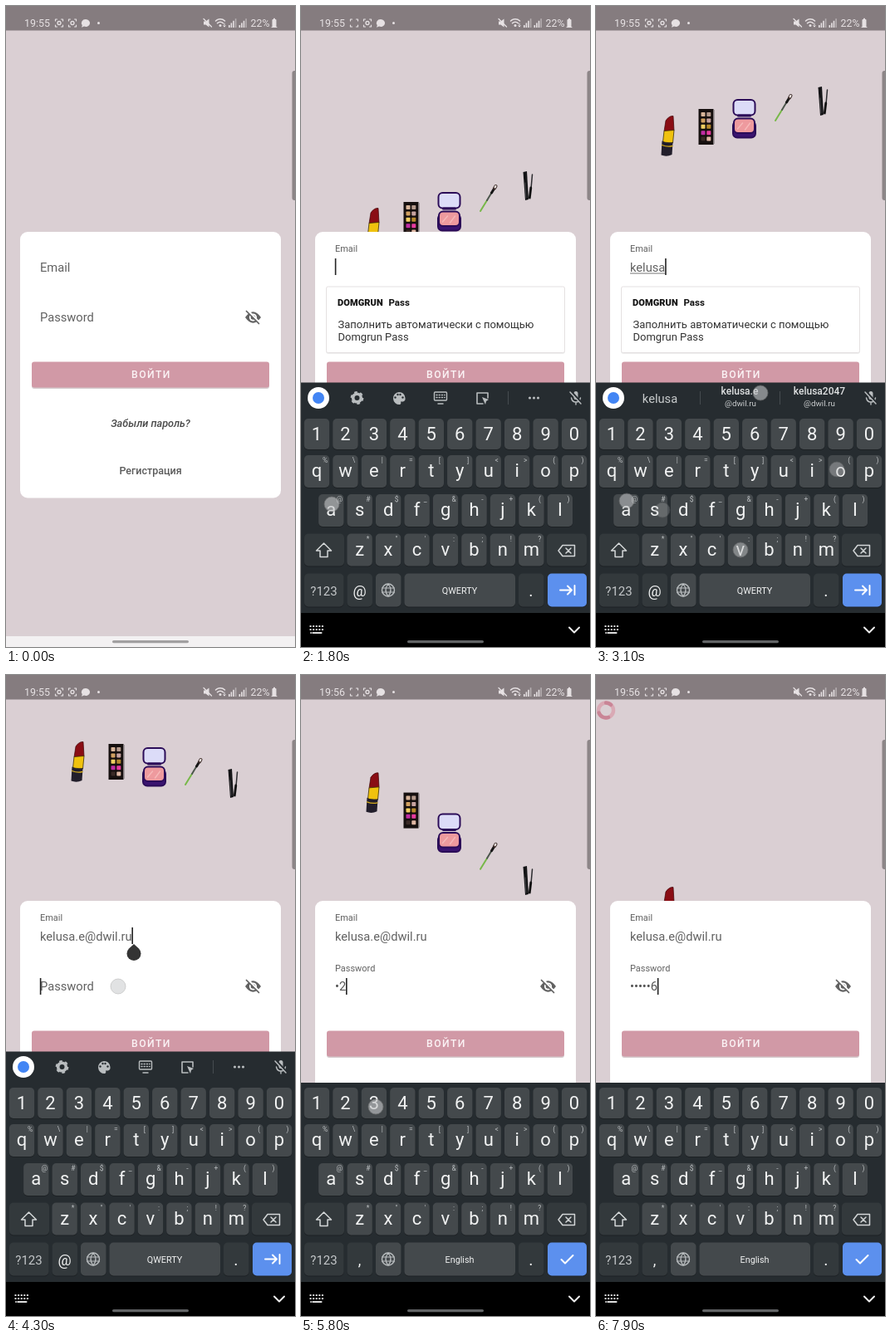
Animation of 348 by 772 pixels, one loop 8000 ms. Source, as an HTML page:

```html
<!DOCTYPE html>
<html lang="ru">
<head>
<meta charset="utf-8">
<title>Login screen</title>
<style>
  html, body { margin: 0; width: 100%; height: 100%; overflow: hidden; background: #dacfd3; }
  svg { display: block; width: 100vw; height: 100vh; font-family: Roboto, "Noto Sans", sans-serif; }
  .mid { text-anchor: middle; }
  .medium { font-weight: 500; }
  .line { fill: none; stroke-linecap: round; stroke-linejoin: round; }
</style>
</head>
<body>
<svg id="stage" viewBox="0 0 348 772" xmlns="http://www.w3.org/2000/svg"></svg>
<script>
const LOOP = 8000;
const USER = 'kelusa', HOST = '@dwil.ru', MAIL = USER + '.e' + HOST, BRAND = 'Domgrun';

const rect = (x, y, w, h, fill, r = 0, extra = '') =>
  `<rect x="${x}" y="${y}" width="${w}" height="${h}" rx="${r}" fill="${fill}" ${extra}/>`;
const circle = (x, y, r, fill, extra = '') => `<circle cx="${x}" cy="${y}" r="${r}" fill="${fill}" ${extra}/>`;
const text = (x, y, size, fill, str, extra = '') =>
  `<text x="${x}" y="${y}" font-size="${size}" fill="${fill}" ${extra}>${str}</text>`;
const mid = (x, y, size, fill, str, extra = '') => text(x, y, size, fill, str, `text-anchor="middle" ${extra}`);
const shape = (d, fill, extra = '') => `<path d="${d}" fill="${fill}" ${extra}/>`;
const line = (d, stroke, width = 1.4, extra = '') =>
  `<path class="line" d="${d}" stroke="${stroke}" stroke-width="${width}" ${extra}/>`;
const group = (id, body, extra = '') => `<g id="${id}" ${extra}>${body}</g>`;
const repeat = (n, fn) => Array.from({ length: n }, (_, i) => fn(i)).join('');

function statusBar() {
  const c = '#e6e1e3';
  const corners = x => line(`M${x - 4.5} 18v-2h2M${x + 2.5} 16h2v2M${x + 4.5} 23v2h-2M${x - 2.5} 25h-2v-2`, c, 1.2);
  const bars = x => repeat(4, i => rect(x + i * 2.6, 23 - i * 2.6, 1.6, 3 + i * 2.6, c, 0, `opacity="${i > 2 ? .5 : 1}"`));
  return rect(0, 0, 348, 29.5, '#857c7f') +
    text(22, 25, 12.45, c, '', 'id="clock"') +
    corners(64) + circle(64, 20.5, 2, 'none', `id="shot" stroke="${c}" stroke-width="1.3"`) +
    corners(80) + circle(80, 20.5, 2, 'none', `stroke="${c}" stroke-width="1.3"`) +
    shape('M96 16a5 4.5 0 1 1-2 8.6l-3 1.2 .8-2.6A5 4.5 0 0 1 96 16z', c) + circle(111.5, 20.5, 1.5, c) +
    shape('M238 18.5h2.5l4-3v10l-4-3H238z', c) + line('M238 15.5l9.5 9.5', c, 1.3) +
    line('M252.5 18a8 8 0 0 1 11 0M254.5 20.8a5 5 0 0 1 7 0', c, 1.5) + circle(258, 23.5, 1.5, c) +
    line('M263 21v4m-1.2-1.2l1.2 1.2l1.2-1.2', c, 1) +
    bars(268) + bars(280.5) + text(294.5, 25, 12.4, c, '22%') +
    rect(320.5, 16, 5, 9.5, c, 1) + rect(322, 14.8, 2, 2, c) + line('M320 25.5h6', c, 1);
}

const lipstick =
  shape('M4 19L6 6Q10 0 15 .5L16 18z', '#8a0d14', 'stroke="#3d0508" stroke-width=".7"') +
  shape('M4 18.5L16 17.5L14.5 33L2.5 32z', '#f0c20e', 'stroke="#3c2f06" stroke-width=".8"') +
  shape('M1.5 30.5Q8 34 14.5 32L13.5 47Q7 50 .5 47.5z', '#221e2b') +
  line('M1.5 35.5Q8 38 14 36.5', '#d6ad1c', 1.3);
const paletteTones = ['#d8b59a', '#b59a8c', '#d0a060', '#c7a3a0', '#f0cf62', '#b78a2c', '#c02ca4', '#e83aa0', '#3a2a26', '#e0b8a4'];
const palette = rect(0, 0, 18, 43, '#16100f') + rect(18, 1, 1.2, 41, '#8d8688') +
  paletteTones.map((c, i) => rect(3 + i % 2 * 6.8, 4 + (i >> 1) * 7.4, 5, 5, c, .8)).join('');
const edge = 'stroke="#2b0c58" stroke-width="2"';
const powder =
  rect(1.5, 27, 27, 19.5, '#3a1470', 5, edge) + rect(2.5, 23.5, 25, 17.5, '#ee9a9e', 5, edge) +
  line('M7 36l6-7M16 37l6-8', '#f6b9b9', 1.4) +
  rect(2, 1, 26, 18.5, '#dcdcf8', 5, edge) + line('M8 20h14', '#2b0c58', 3);
const brush =
  line('M1 32L9 19', '#77b848', 2) + line('M9 19L15 9', '#4c564c', 2) +
  line('M14.5 10L17.5 5', '#151515', 3) + line('M18 4.5L19.5 2', '#3a2b28', 4) + line('M18.6 3.4L19.4 2', '#f1e7e3', 2.2);
const mascara =
  shape('M0 1L4.5 0L6.5 34L2.5 35z', '#141416') + line('M2.5 14l1 18', '#55555a', .8) +
  line('M11 4L9.5 21', '#2b2b2e', 1.5) + line('M9.3 20L7.8 32', '#111', 2.8);

// Height of each cosmetic's top edge: [seconds, y]
const items = [
  { id: 'lipstick', x: 78, art: lipstick, path: [[.5, 345], [1.8, 243], [3.1, 132], [4.3, 80], [5.1, 88], [6.7, 173], [8, 262]] },
  { id: 'palette', x: 123.5, art: palette, path: [[.5, 340], [1.8, 236], [3.1, 124], [4.3, 83], [5.1, 103], [6.7, 205], [8, 292]] },
  { id: 'powder', x: 163.5, art: powder, path: [[.5, 330], [1.8, 224], [3.1, 112], [4.3, 87], [5.1, 120], [6.7, 236], [8, 325]] },
  { id: 'brush', x: 215, art: brush, path: [[.5, 322], [1.8, 215], [3.1, 106], [4.3, 100], [5.1, 147], [6.7, 276], [8, 360]] },
  { id: 'mascara', x: 267.5, art: mascara, path: [[.5, 305], [1.8, 199], [3.1, 97], [4.3, 113], [5.1, 174], [6.7, 300], [8, 385]] }
];

function card() {
  const g = '#616161';
  return rect(17, 272, 314, 320.5, '#fff', 9) +
    text(0, 0, 14.7, g, 'Email', 'id="mailLabel"') + text(0, 0, 14.7, g, 'Password', 'id="passLabel"') +
    text(41, 319.5, 14.7, '#626262', '', 'id="mail"') + rect(41, 321.5, 43, 1, '#777', 0, 'id="underline"') +
    text(41, 380, 14.7, '#555', '', 'id="pass"') +
    rect(0, 304, 1.6, 20, '#222', 0, 'id="mailCaret"') + rect(0, 365, 1.6, 20, '#222', 0, 'id="passCaret"') +
    shape('M154 324l6 5.5a8.5 8.5 0 1 1-12 0z', '#343434', 'id="handle"') +
    shape('M288 375Q297.500 361.500 307 375Q297.500 388.500 288 375z', g) + circle(297.5, 375, 4.6, '#fff') + circle(297.5, 375, 2.8, g) +
    line('M290.500 366.500L305.500 382', '#fff', 3.2) + line('M289.500 367.500L304.500 382.500', g, 1.7) +
    rect(31, 430, 286, 31, '#b9a9ad', 3, 'opacity=".6"') + rect(31, 428.5, 286, 31, '#d199a6', 3) +
    mid(175, 448.3, 12.2, '#fbf3f5', 'ВОЙТИ', 'class="medium" letter-spacing="1.4"') +
    mid(174, 506.5, 12.7, '#4a4a4a', 'Забыли пароль?', 'class="medium" font-style="italic"') +
    mid(174, 563.5, 12.5, '#5a5a5a', 'Регистрация', 'class="medium"');
}

function popup() {
  return group('popupLight',
    rect(30, 339, 288, 80, '#000', 3, 'opacity=".07"') + rect(30.5, 338, 287, 79.5, '#fff', 2, 'stroke="#e4e0e1"') +
    text(44, 361, 11, '#111', BRAND.toUpperCase(), 'font-weight="900" letter-spacing=".1"') +
    text(105.5, 361, 11.5, '#111', 'Pass', 'font-weight="700"') +
    text(44.5, 388, 13, '#333', 'Заполнить автоматически с помощью') +
    text(44.5, 403, 13, '#333', BRAND + ' Pass')) +
    rect(35, 339, 277, 77, '#000', 1, 'id="popupDark" opacity=".6"');
}

function keyboard() {
  const KEY = '#44494c', DIM = '#33393c', INK = '#f1f2f2', SOFT = '#b9bdbf';
  const key = (x, y, w, h, fill = KEY) => rect(x, y + 1, w, h, '#1d2124', 5) + rect(x, y, w, h, fill, 5);
  const row = (chars, hints, x, y, h) => [...chars].map((ch, i) => {
    const cx = x + i * 34.45;
    return key(cx - 15.2, y, 30.4, h) + mid(cx, y + h / 2 + (hints ? 6.5 : 7.8), 22, INK, ch) +
      (hints ? mid(cx + 10, y + 9, 8.5, SOFT, hints[i].replace('&', '&amp;').replace('<', '&lt;')) : '');
  }).join('');

  const toolbar = group('toolbar',
    circle(67.5, 472, 4.8, 'none', `stroke="${SOFT}" stroke-width="3.600"`) +
    circle(67.5, 472, 6.9, 'none', `stroke="${SOFT}" stroke-width="2" stroke-dasharray="3.600 3.625"`) +
    shape('M118 465a7.500 7.500 0 1 0 1 15q2-1 1-3.500h3q3-1 2.500-4.500q-1-7-7.500-7z', SOFT) +
    repeat(4, i => circle(113.5 + i * 3, i % 3 ? 468 : 471.5, 1.2, '#262c30')) +
    rect(160.5, 465, 15, 10, 'none', 1, `stroke="${SOFT}" stroke-width="1.4"`) +
    line('M163 468.500h10M163 471.500h10', SOFT, 1.5, 'stroke-dasharray="1 2.200"') + line('M165 479h6', SOFT, 1.5) +
    line('M219 479h-7v-13h13v6', SOFT, 1.6) + shape('M218 471l8 3-3 2-1 4z', SOFT) +
    rect(249, 464, 1, 16, '#454b4f') + repeat(3, i => circle(275.5 + i * 5, 472, 1.6, SOFT)));
  const suggestions = group('suggestions',
    mid(77, 478, 14.7, '#c9cccd', '', 'id="typed"') + rect(125, 464, 1, 16, '#454b4f') + rect(221, 464, 1, 16, '#454b4f') +
    mid(173, 468, 12, '#dfe1e2', USER + '.e', 'class="medium"') + mid(174, 482, 9.8, '#c9cccd', HOST) +
    mid(269, 468, 12, '#dfe1e2', USER + '2047', 'class="medium"') + mid(269, 482, 9.8, '#c9cccd', HOST));
  const strip = group('strip', rect(0, 453.5, 348, 40, '#262c30') +
    circle(21, 472, 13, '#fff') + circle(21, 472, 7, '#4285f4') + toolbar + suggestions +
    rect(328.5, 464, 5, 10, SOFT, 2.5) + line('M325.500 472q1 5 5.500 5t5.500-5M331 477v3', SOFT, 1.4) +
    line('M325 464.500l13 14', '#262c30', 3) + line('M324 465l13 14', SOFT, 1.5));

  return strip + rect(0, 491, 348, 240.5, '#262c30') +
    row('1234567890', '', 19, 497, 37) +
    row('qwertyuiop', '%\\|=[]<>()', 19, 541, 39) +
    row('asdfghjkl', '@#$_&-+()', 36.3, 588, 39) +
    row('zxcvbnm', '*"\':;!?', 70.6, 635.5, 39) +
    key(4, 635.5, 48, 39, DIM) + line('M27.500 647l9 9h-4.500v7.500h-9v-7.500h-4.500z', '#d3d6d7', 1.5) +
    key(296, 635.5, 48, 39, DIM) + line('M315 649.500h14.500v13H315l-5-6.500zM319 653l6 6m0-6l-6 6', '#d3d6d7', 1.5) +
    key(4, 683.5, 47.5, 40, DIM) + mid(27.5, 709.5, 15, '#c5c8ca', '?123') +
    key(55.5, 683.5, 30.5, 40, DIM) + mid(70.5, 711, 18, INK, '', 'id="sideKey"') +
    key(90, 683.5, 30.5, 40) + circle(105, 703.5, 7.5, 'none', `stroke="${SOFT}" stroke-width="1.400"`) +
    line('M97.500 701h15M97.500 706h15M105 696q-6 7.500 0 15q6-7.500 0-15', SOFT, 1.2) +
    key(124.5, 683.5, 133.5, 40) + mid(191, 708, 10.8, INK, '', 'id="spaceKey"') +
    key(262, 683.5, 30.5, 40, DIM) + mid(277, 711, 20, INK, '.') +
    key(297, 683.5, 47, 40, '#5c90ee') +
    line('M312 703.500h14m-5-5l5 5l-5 5M329.500 698v11', '#fff', 1.9, 'id="next"') +
    line('M313.500 704l4.500 4.500l9.500-9.500', '#fff', 2, 'id="done"') +
    rect(0, 731, 348, 42, '#000') +
    repeat(12, i => rect(10.5 + i % 5 * 3.6 + (i > 9 ? 3 : 0), 746 + Math.floor(i / 5) * 4, 2, 2, '#ddd')) +
    line('M12 755h0M15.500 755h9', '#ddd', 2) +
    line('M323 748.500l6 6l6-6', '#eee', 2) + rect(128, 764, 92, 3.2, '#626466', 1.6);
}

// Taps: start ms, x, y, fade length
const taps = [
  [680, 110, 316, 300], [1760, 37, 600, 1100], [1930, 258, 559, 1100], [2250, 80, 607, 1100], [2500, 290, 558, 1100],
  [2750, 174, 655, 1100], [2900, 37, 596, 1100], [3060, 198, 466, 1000], [3800, 140, 316, 300], [4220, 135, 375, 250],
  [4780, 19, 520, 250], [5450, 55, 520, 250], [5800, 90, 520, 250], [6080, 124, 520, 250], [6400, 158, 520, 200],
  [6650, 195, 521, 260], [7380, 175, 446, 300]
];
const mailKeys = [1900, 2050, 2300, 2550, 2800, 2950];
const passKeys = [4830, 5520, 5860, 6140, 6460, 6770];

document.getElementById('stage').innerHTML =
  rect(0, 0, 348, 772, '#dacfd3') + rect(0, 759, 348, 13, '#f3f1f2') + rect(128, 764, 92, 3.2, '#a19fa0', 1.6) +
  items.map(i => group(i.id, i.art)).join('') + card() + group('popup', popup()) +
  group('keyboard', keyboard()) + statusBar() + rect(344.5, 78, 6, 156, '#8d8688', 3) +
  group('spinner', circle(0, 0, 9, 'none', 'stroke="#d9a9b4" stroke-width="4.400"') +
    line('M0-9A9 9 0 0 1 6-6.700M-8.500 3A9 9 0 0 0 3 8.500', '#c98596', 4.4)) +
  taps.map((t, i) => circle(t[1], t[2], 9, '#c4c6c8', `id="tap${i}" stroke="#888" stroke-width=".8"`)).join('');

const $ = id => document.getElementById(id);
const set = (id, name, value) => $(id).setAttribute(name, value);
const show = (id, on) => set(id, 'visibility', on ? 'inherit' : 'hidden');
const write = (id, str) => { if ($(id).textContent !== str) $(id).textContent = str; };
const ease = (t, from, to) => { const p = Math.min(1, Math.max(0, (t - from) / (to - from))); return 1 - (1 - p) ** 2; };

// Smooth curve through unevenly spaced points
function curve(points, t) {
  if (t <= points[0][0]) return points[0][1];
  const last = points.length - 1;
  const slope = i => (points[i + 1][1] - points[i][1]) / (points[i + 1][0] - points[i][0]);
  const tangent = i => {
    if (i === 0 || i === last) return slope(i ? i - 1 : 0);
    const a = points[i][0] - points[i - 1][0], b = points[i + 1][0] - points[i][0];
    return (slope(i - 1) * b + slope(i) * a) / (a + b);
  };
  let i = 0;
  while (i < last - 1 && t > points[i + 1][0]) i++;
  const h = points[i + 1][0] - points[i][0], u = (t - points[i][0]) / h, v = 1 - u;
  return v * v * (1 + 2 * u) * points[i][1] + u * u * (3 - 2 * u) * points[i + 1][1] +
    h * u * v * (v * tangent(i) - u * tangent(i + 1));
}

function floatLabel(id, restY, p) {
  set(id, 'transform', `translate(41 ${restY - 23.5 * p}) scale(${1 - .255 * p})`);
}

function caret(id, field, edits, t) {
  const lastEdit = Math.max(...edits.filter(e => e <= t));
  show(id, t >= edits[0] && (t - lastEdit) % 1000 < 500);
  set(id, 'x', 40.8 + (field.textContent ? field.getComputedTextLength() : 0));
}

function render(t) {
  for (const { id, x, path } of items) set(id, 'transform', `translate(${x} ${curve(path, t / 1000)})`);

  write('clock', t < 5700 ? '19:55' : '19:56');
  show('shot', t % 1000 < 600);

  const picked = t >= 3200, passMode = t >= 4550;
  const typed = USER.slice(0, mailKeys.filter(k => k <= t).length);
  write('mail', picked ? MAIL : typed);
  show('underline', typed && !picked);
  set('underline', 'width', $('mail').getComputedTextLength());
  const count = passKeys.filter(k => k <= t).length;
  write('pass', count ? '•'.repeat(count - 1) + count : '');
  floatLabel('mailLabel', 319.5, ease(t, 750, 900));
  floatLabel('passLabel', 380, ease(t, 4330, 4480));
  caret('mailCaret', $('mail'), [750, ...mailKeys, 3200], t);
  if (t > 4350) show('mailCaret', false);
  caret('passCaret', $('pass'), [4260, ...passKeys], t);
  show('handle', t >= 3850 && t < 4350);

  const closing = t >= 4950 && t < 5200;
  show('popupLight', (t >= 1350 && t < 3200) || (t >= 4700 && t < 4950));
  show('popupDark', closing);
  set('popup', 'transform', `translate(0 ${t > 4000 ? 59 : 0})`);

  const up = ease(t, 1020, 1280);
  show('keyboard', up > 0);
  set('keyboard', 'transform', `translate(0 ${320 * (1 - up)})`);
  const suggesting = t >= 1950 && !picked;
  show('strip', !passMode);
  show('toolbar', !suggesting);
  show('suggestions', suggesting);
  write('typed', typed);
  write('sideKey', passMode ? ',' : '@');
  write('spaceKey', passMode ? 'English' : 'QWERTY');
  show('next', !passMode);
  show('done', passMode);

  show('spinner', t >= 7550);
  set('spinner', 'transform', `translate(12 42.5) rotate(${(t - 7900) * .4})`);

  taps.forEach(([start, , , life], i) => {
    const age = (t - start) / life;
    set('tap' + i, 'opacity', age < 0 || age > 1 ? 0 : .62 * (1 - age) ** .6);
  });
}

let start;
function tick(now) {
  start ??= now;
  render((now - start) % LOOP);
  requestAnimationFrame(tick);
}
render(0);
requestAnimationFrame(tick);
</script>
</body>
</html>
```
